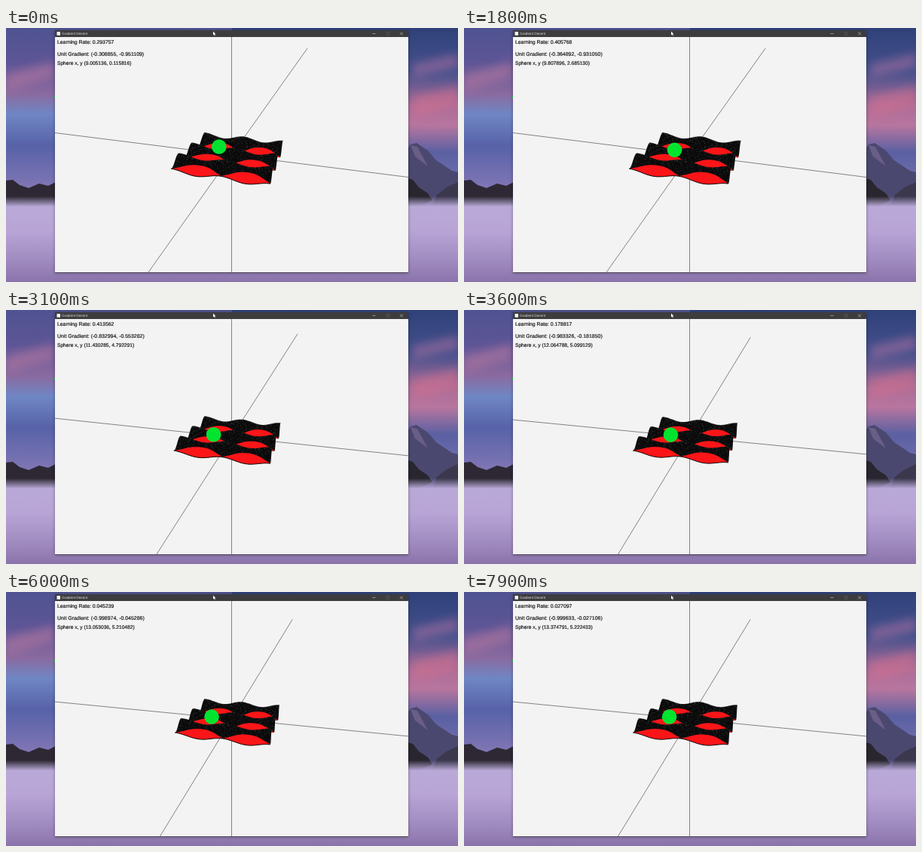
These frames come from a looping animation (600 by 338 pixels, 8000 ms). An HTML page:

```html
<!DOCTYPE html>
<html lang="en">
<head>
<meta charset="utf-8">
<title>Gradient Decent</title>
<style>
  html, body { margin: 0; width: 100%; height: 100%; overflow: hidden; background: #4a5088; }
  svg { display: block; width: 100vw; height: 100vh; }
  text { font-family: "Liberation Sans", Arial, sans-serif; text-rendering: geometricPrecision; }
</style>
</head>
<body>
<svg viewBox="0 0 600 338" preserveAspectRatio="none">
  <defs>
    <linearGradient id="leftSky" x2="0" y2="1">
      <stop offset="0" stop-color="#4f5391"/>
      <stop offset=".2" stop-color="#5d5596"/>
      <stop offset=".38" stop-color="#8a6a9f"/>
      <stop offset=".5" stop-color="#6f86c4"/>
      <stop offset=".68" stop-color="#5762a8"/>
      <stop offset="1" stop-color="#8d7cb8"/>
    </linearGradient>
    <linearGradient id="rightSky" x2="0" y2="1">
      <stop offset="0" stop-color="#30417a"/>
      <stop offset=".25" stop-color="#44508c"/>
      <stop offset=".45" stop-color="#a96c98"/>
      <stop offset=".56" stop-color="#b8769f"/>
      <stop offset=".72" stop-color="#5a60a2"/>
      <stop offset="1" stop-color="#7f78b4"/>
    </linearGradient>
    <linearGradient id="mist" x2="0" y2="1">
      <stop offset="0" stop-color="#b9a9d8" stop-opacity="0"/>
      <stop offset=".12" stop-color="#b9a9d8"/>
      <stop offset=".4" stop-color="#b8a5d6"/>
      <stop offset=".75" stop-color="#a08bc0"/>
      <stop offset="1" stop-color="#8a73aa"/>
    </linearGradient>
    <filter id="soft" x="-50%" y="-50%" width="200%" height="200%"><feGaussianBlur stdDeviation="6"/></filter>
    <filter id="edge"><feGaussianBlur stdDeviation=".6"/></filter>
    <filter id="shade" x="-5%" y="-5%" width="110%" height="110%"><feGaussianBlur stdDeviation="2"/></filter>
    <clipPath id="view"><rect x="65" y="12" width="469" height="313"/></clipPath>
  </defs>

  <rect width="300" height="230" fill="url(#leftSky)"/>
  <rect x="300" width="300" height="230" fill="url(#rightSky)"/>
  <g filter="url(#soft)" opacity=".6">
    <path d="M0,62 L64,44 V66 L0,84Z" fill="#b0749f"/>
    <path d="M540,48 L600,34 V52 L540,66Z" fill="#a06c9e"/>
    <path d="M540,92 L600,78 V104 L540,120Z" fill="#d0708f"/>
  </g>
  <g filter="url(#edge)">
    <path d="M530,166 L537,155 545,153 560,163 571,176 592,190 600,192 V250 H530Z" fill="#4b4870"/>
    <path d="M537,156 L546,158 560,184 543,171Z" fill="#6a5e86"/>
    <path d="M530,199 L540,202 548,212 560,220 566,229 545,239 H530Z" fill="#29262f"/>
    <path d="M600,205 L585,212 572,222 566,238 H600Z" fill="#3b384e"/>
    <path d="M0,203 L9,202 18,209 30,213 44,207 56,210 70,203 V242 H0Z" fill="#2d2833"/>
  </g>
  <rect y="224" width="600" height="114" fill="url(#mist)"/>

  <rect x="65" y="4" width="469" height="322" opacity=".35" filter="url(#shade)"/>
  <rect x="65" y="3" width="469" height="322.600" fill="#3d3d3e"/>
  <rect x="65" y="12" width="469" height="313" fill="#f3f3f3"/>
  <rect x="64" y="90" width="1" height="3" fill="#18b83c"/>
  <rect x="67.500" y="5" width="4.500" height="4.800" fill="#f2f2f2"/>
  <text x="74" y="9.200" font-size="4.700" fill="#dedede">Gradient Decent</text>
  <g fill="none" stroke="#c9c9c9" stroke-width=".6">
    <path d="M486.500,7.500 h4 M523,5.500 l4,4 m0,-4 l-4,4"/>
    <rect x="505" y="5.700" width="3.600" height="3.600" stroke="#626262"/>
  </g>
  <path d="M275,4.500 v5.100 l1.200,-1.100 .8,1.800 .8,-.4 -.8,-1.600 1.400,-.1Z" fill="#fff"/>

  <g clip-path="url(#view)">
    <g stroke="#5c5c5c" stroke-width=".75">
      <path d="M299.500,12 V325"/>
      <path id="depthAxis"/>
      <path id="sideAxis"/>
    </g>
    <g id="sheet" fill="#0a0a0b"></g>
    <circle id="ball" r="9.800" fill="#00e430"/>
  </g>
  <g fill="#161616" stroke="#161616" stroke-width=".18">
    <text id="rate" x="68" y="20.700" font-size="6.850"/>
    <text id="gradient" x="68" y="36.500" font-size="6.950"/>
    <text id="position" x="68" y="49" font-size="6.650"/>
  </g>
</svg>
<script>
const LOOP = 8000, STEP = 100;
const CX = 299.5, CY = 169;
const DESCENT = 0.0046; // distance per ms for a gradient of length 1
const el = id => document.getElementById(id);
const mix = (a, b, p) => a + (b - a) * p;
const clamp = (v, lo, hi) => Math.min(hi, Math.max(lo, v));

// ---- Wavy sheet ----
const WAVES_V = 2.55, HEIGHT_U = 2.6, HEIGHT_V = 6.5;

function project(u, v) {
  const x = mix(mix(263.5, 367.5, u), mix(219, 351, u), v);
  const y = mix(mix(139, 150, u), mix(174.5, 194.5, u), v);
  const drop = HEIGHT_U * (1 - Math.cos(4 * Math.PI * u))
    + HEIGHT_V * (1 - Math.cos(2 * Math.PI * WAVES_V * v));
  return `${x.toFixed(2)},${(y + drop).toFixed(2)}`;
}

const ramp = (a, b, n) => Array.from({ length: n + 1 }, (_, i) => mix(a, b, i / n));

// Outline of the part u0..u1 between two edges given as functions v(u)
function patch(u0, u1, near, far) {
  return 'M' + [
    ...ramp(u0, u1, 40).map(u => project(u, near(u))),
    ...ramp(near(u1), far(u1), 12).map(v => project(u1, v)),
    ...ramp(u1, u0, 40).map(u => project(u, far(u))),
    ...ramp(far(u0), near(u0), 12).map(v => project(u0, v))
  ].join('L') + 'Z';
}

let seed = 7;
const random = () => (seed = seed * 16807 % 2147483647) / 2147483647;

// Ridges are painted from back to front, so each hides the valley behind it.
function ridge(k) {
  const toV = phase => clamp((k + phase) / WAVES_V, 0, 1);
  const swell = u => 0.32 * Math.abs(Math.sin(2 * Math.PI * u));
  let dots = '';
  for (let i = 0; i < 420; i++) dots += `M${project(random(), toV(mix(-0.04, 0.45, random())))}h.6`;
  const valley = [0, 0.5].map(u0 =>
    patch(u0, u0 + 0.5, u => toV(0.5 - swell(u)), u => toV(0.5 + swell(u) / 2))).join('');
  return `<path d="${patch(0, 1, () => toV(-0.06), () => toV(0.6))}"/>
    <path d="${dots}" stroke="#5a5a5c" stroke-width=".6"/>
    <path d="${valley}" fill="#fb1518"/>`;
}
el('sheet').innerHTML = [0, 1, 2].map(ridge).join('')
  + `<path d="M${ramp(0, 1, 50).map(u => project(u, 1)).join('L')}" fill="none" stroke="#0a0a0b"/>`;

// ---- Descent: time, position, gradient length, y part of the unit gradient ----
const stops = [
  [0, 9.005136, 0.115816, 0.293757, 0.951109],
  [700, 9.279335, 0.956951, 0.300142, 0.948627],
  [2700, 10.778629, 4.245351, 0.499317, 0.725342],
  [3600, 12.064788, 5.099129, 0.178817, 0.181850],
  [4600, 12.685306, 5.186757, 0.077482, 0.077717],
  [6000, 13.053036, 5.210482, 0.045239, 0.045286],
  [7900, 13.374791, 5.222433, 0.027097, 0.027106]
].map(([t, x, y, rate, uy]) => ({
  t, x, y,
  vx: DESCENT * rate * Math.sqrt(1 - uy * uy),
  vy: DESCENT * rate * uy
}));

// Cubic through two stops that follows the slope at each: [value, velocity]
function cubic(p0, p1, v0, v1, span, s) {
  const rise = p1 - p0, a = v0 * span, b = v1 * span;
  const c2 = 3 * rise - 2 * a - b, c3 = a + b - 2 * rise;
  return [p0 + s * (a + s * (c2 + s * c3)), (a + s * (2 * c2 + 3 * s * c3)) / span];
}

function descend(t) {
  const i = Math.max(1, stops.findIndex(s => t <= s.t));
  const a = stops[i - 1], b = stops[i], span = b.t - a.t, s = (t - a.t) / span;
  const [x, vx] = cubic(a.x, b.x, a.vx, b.vx, span, s);
  const [y, vy] = cubic(a.y, b.y, a.vy, b.vy, span, s);
  const speed = Math.hypot(vx, vy);
  return { x, y, rate: speed / DESCENT, ux: -vx / speed, uy: -vy / speed };
}

// Line through the centre; back is the length of the far side
const axis = (dx, dy, back) => `M${CX + dx},${CY + dy}L${CX - dx * back},${CY - dy * back}`;
const pair = (a, b) => `(${a.toFixed(6)}, ${b.toFixed(6)})`;

function render(time) {
  const t = Math.floor(time / STEP) * STEP;
  const turn = clamp((t - 1900) / 1700, 0, 1);
  const { x, y, rate, ux, uy } = descend(t);

  el('depthAxis').setAttribute('d', axis(mix(-110.5, -95, turn), 156, 0.91 - 0.06 * turn * turn));
  el('sideAxis').setAttribute('d', axis(235, mix(29.6, 23, turn), 1));
  el('sheet').setAttribute('transform', `translate(${CX} ${CY}) matrix(${1 - 0.05 * turn} ${-0.018 * turn} ${0.06 * turn} ${1 - 0.085 * turn} 0 0) translate(${-CX} ${-CY})`);
  el('ball').setAttribute('cx', 295.05 - 1.35 * x - 0.85 * y);
  el('ball').setAttribute('cy', 159.6 - 0.2 * x + 1.75 * y);

  el('rate').textContent = `Learning Rate: ${rate.toFixed(6)}`;
  el('gradient').textContent = `Unit Gradient: ${pair(ux, uy)}`;
  el('position').textContent = `Sphere x, y ${pair(x, y)}`;
}

const start = performance.now();
function tick() {
  render((performance.now() - start) % LOOP);
  requestAnimationFrame(tick);
}
tick();
</script>
</body>
</html>
```
